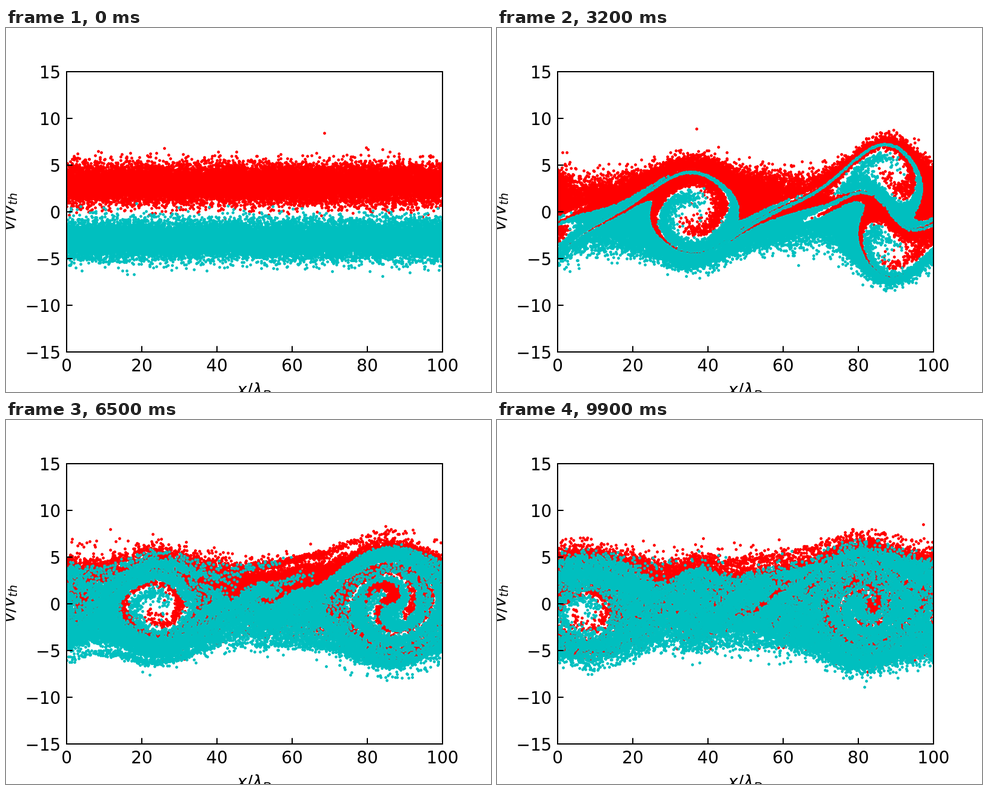
Animation of 800 by 600 pixels, one loop 10000 ms. Source, as an HTML page with a canvas:

```html
<!DOCTYPE html>
<html lang="en">
<head>
<meta charset="utf-8">
<title>Two-stream instability</title>
<style>
  html, body { margin: 0; width: 100%; height: 100%; overflow: hidden; background: #fff; }
  canvas, svg { position: absolute; left: 0; top: 0; }
  text { font-family: "DejaVu Sans", sans-serif; font-size: 27.8px; }
  .var { font-style: italic; }
  .sub { font-style: italic; font-size: 19.5px; }
</style>
</head>
<body>
<canvas id="plot" width="800" height="600"></canvas>
<svg id="axes" width="800" height="600" viewBox="0 0 800 600">
  <path id="lines" fill="none" stroke="#000" stroke-width="2"/>
  <g id="labels"></g>
  <text x="381" y="606"><tspan class="var">x</tspan>/<tspan class="var">λ</tspan><tspan class="sub" dy="5">D</tspan></text>
  <text transform="translate(13.5 334) rotate(-90)"><tspan class="var">v</tspan>/<tspan class="var">v</tspan><tspan class="sub" dy="4.5">th</tspan></text>
</svg>
<script>
const FRAMES = 100, FRAME_MS = 100, SUBSTEPS = 4;
const LENGTH = 100, CELLS = 1000, COUNT = 40000, BEAM = 3;
const BOX = { left: 100, top: 72, width: 620, height: 462 };
const RED = [255, 0, 0], CYAN = [0, 191, 191];

const toX = x => BOX.left + x * 6.2;
const toY = v => 303 - v * 15.4;

function drawAxes() {
  let lines = `M${BOX.left} ${BOX.top}h${BOX.width}v${BOX.height}h${-BOX.width}z`;
  let labels = '';
  const label = (x, y, anchor, n) => {
    labels += `<text x="${x}" y="${y}" text-anchor="${anchor}">${String(n).replace('-', '\u2212')}</text>`;
  };
  for (let x = 0; x <= 100; x += 20) {
    lines += `M${toX(x)} 534v-9.7`;
    label(toX(x), 566, 'middle', x);
  }
  for (let v = -15; v <= 15; v += 5) {
    lines += `M100 ${toY(v)}h9.7`;
    label(90.3, toY(v) + 10.6, 'end', v);
  }
  document.getElementById('lines').setAttribute('d', lines);
  document.getElementById('labels').innerHTML = labels;
}

// Smooth curve through [time, value] points.
function curve(points) {
  const slope = i => {
    const a = points[Math.max(i - 1, 0)], b = points[Math.min(i + 1, points.length - 1)];
    return (b[1] - a[1]) / (b[0] - a[0]);
  };
  return t => {
    let i = 0;
    while (i < points.length - 2 && t > points[i + 1][0]) i++;
    const [t0, a] = points[i], [t1, b] = points[i + 1];
    const h = t1 - t0, s = Math.min(Math.max((t - t0) / h, 0), 1), r = 1 - s;
    return a * r * r * (1 + 2 * s) + b * s * s * (3 - 2 * s)
      + h * s * r * (slope(i) * r - slope(i + 1) * s);
  };
}

// Potential wells: a lone one drifting left, and a pair that merges.
const loneCentre = curve([[0, 36], [16, 36], [32, 35.5], [56, 27], [74, 21.5], [88, 15.5], [99, 8.5]]);
const loneDepth = curve([[0, 14], [15, 14], [22, 8], [29, 11], [40, 9], [56, 10], [99, 9.5]]);
const pairCentre = curve([[0, 86], [16, 86], [32, 88], [56, 87], [74, 85.5], [88, 84], [99, 81.5]]);
const pairDepth = curve([[0, 13], [15, 13], [22, 8], [30, 11], [40, 8], [56, 8], [99, 8]]);
const pairWidth = curve([[0, 7.7], [32, 7.5], [50, 9.3], [99, 9.3]]);

function pairOffset(t) {
  if (t < 16) return 15;
  if (t < 32) return 15 * (1 - ((t - 16) / 16) ** 3.3);
  return -8 * Math.sin(0.4 * (t - 32)) * Math.exp((32 - t) / 6);
}

// Small travelling waves and noise mix the beams once the wells have formed.
const WAVES = [[5, 1.7, 0], [5, -1.7, 1], [7, 0.5, 2], [7, -0.5, 4]];
const WAVE_DEPTH = 0.55, KICK = 0.2;
const turbulence = t => Math.min(Math.max((t - 30) / 8, 0), 1);

const potential = new Float64Array(CELLS);
const force = new Float64Array(CELLS);

function updateForce(t) {
  const growth = 1 / (1 + Math.exp(-0.4 * (t - 11.7)));
  const mid = pairCentre(t), offset = pairOffset(t), width = pairWidth(t);
  const wells = [
    [loneCentre(t), loneDepth(t), 7.7],
    [mid - offset, pairDepth(t), width],
    [mid + offset, pairDepth(t), width]
  ];
  const ripple = WAVE_DEPTH * turbulence(t);
  const step = LENGTH / CELLS;
  for (let i = 0; i < CELLS; i++) {
    const x = (i + 0.5) * step;
    let depth = 0, waves = 0;
    for (const [centre, strength, w] of wells) {
      let d = x - centre;
      d -= LENGTH * Math.round(d / LENGTH);
      depth += strength * growth * Math.exp(-d * d / (2 * w * w));
    }
    for (const [mode, speed, phase] of WAVES) {
      waves += Math.cos(2 * Math.PI * mode * (x - speed * t) / LENGTH + phase);
    }
    potential[i] = ripple * waves * Math.exp(-depth / 3) - depth;
  }
  for (let i = 0; i < CELLS; i++) {
    force[i] = (potential[(i + CELLS - 1) % CELLS] - potential[(i + 1) % CELLS]) / (2 * step);
  }
}

function seeded(seed) {
  return () => {
    seed = (seed + 0x6D2B79F5) | 0;
    let n = Math.imul(seed ^ (seed >>> 15), 1 | seed);
    n = (n + Math.imul(n ^ (n >>> 7), 61 | n)) ^ n;
    return ((n ^ (n >>> 14)) >>> 0) / 4294967296;
  };
}

const xs = new Float64Array(COUNT), vs = new Float64Array(COUNT);
let simFrame = 0, random;

function reset() {
  random = seeded(42);
  for (let i = 0; i < COUNT; i++) {
    const normal = Math.sqrt(-2 * Math.log(1 - random())) * Math.cos(2 * Math.PI * random());
    xs[i] = random() * LENGTH;
    vs[i] = normal + (i < COUNT / 2 ? BEAM : -BEAM);
  }
  simFrame = 0;
}

function advance() {
  const dt = 1 / SUBSTEPS, scale = CELLS / LENGTH;
  for (let s = 0; s < SUBSTEPS; s++) {
    updateForce(simFrame + (s + 0.5) * dt);
    for (let i = 0; i < COUNT; i++) {
      let x = xs[i] + vs[i] * dt / 2;
      x -= LENGTH * Math.floor(x / LENGTH);
      vs[i] += force[Math.min(x * scale | 0, CELLS - 1)] * dt;
      x += vs[i] * dt / 2;
      xs[i] = x - LENGTH * Math.floor(x / LENGTH);
    }
  }
  const kick = KICK * turbulence(simFrame);
  if (kick > 0) {
    for (let i = 0; i < COUNT; i++) vs[i] += kick * (random() - 0.5);
  }
  simFrame++;
}

const ctx = document.getElementById('plot').getContext('2d');
const image = ctx.createImageData(BOX.width, BOX.height);

// Pixel coverage of one round marker.
const marker = [];
for (let y = -2; y <= 2; y++) {
  for (let x = -2; x <= 2; x++) {
    marker.push([x, y, Math.min(Math.max(2.9 - Math.hypot(x, y), 0), 1)]);
  }
}

function stamp(cx, cy, colour) {
  const data = image.data;
  for (const [dx, dy, alpha] of marker) {
    const x = cx + dx, y = cy + dy;
    if (x < 0 || y < 0 || x >= BOX.width || y >= BOX.height) continue;
    const p = (y * BOX.width + x) * 4;
    for (let c = 0; c < 3; c++) data[p + c] += (colour[c] - data[p + c]) * alpha;
  }
}

function paint() {
  image.data.fill(255);
  for (let i = 0; i < COUNT; i++) {
    stamp(Math.round(toX(xs[i]) - BOX.left), Math.round(toY(vs[i]) - BOX.top),
      i < COUNT / 2 ? RED : CYAN);
  }
  ctx.putImageData(image, BOX.left, BOX.top);
}

let shown = -1;

function render(ms) {
  const frame = Math.floor(ms / FRAME_MS) % FRAMES;
  if (frame !== shown) {
    if (frame < simFrame) reset();
    while (simFrame < frame) advance();
    paint();
    shown = frame;
  }
}

function tick() {
  render(performance.now());
  requestAnimationFrame(tick);
}

drawAxes();
reset();
tick();
</script>
</body>
</html>
```
